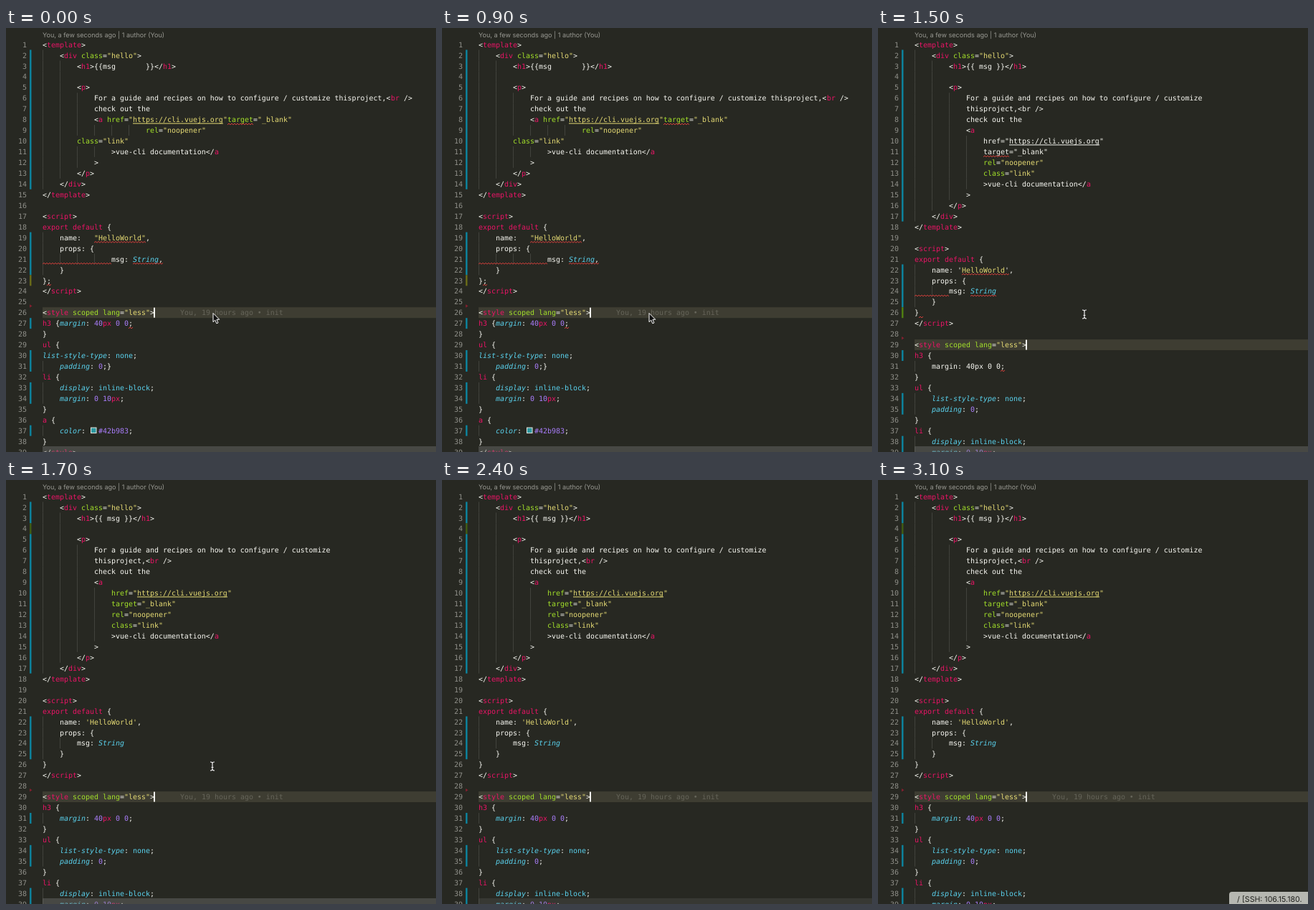
Recreate the animation shown at these times as an HTML page. Size 600 by 591 pixels, loop 3200 ms.

```html
<!DOCTYPE html>
<html lang="en">
<head>
<meta charset="utf-8">
<title>Format on save</title>
<style>
  html, body { margin: 0; width: 100%; height: 100%; overflow: hidden; background: #272822; }
  svg { display: block; width: 600px; height: 591px; }
  text { white-space: pre; text-rendering: geometricPrecision; }
  .code { font: 9.966px "DejaVu Sans Mono", monospace; }
  .ui { font-family: Inter, sans-serif; }
</style>
</head>
<body>
<svg id="stage" viewBox="0 0 600 591" xmlns="http://www.w3.org/2000/svg"></svg>
<script>
(() => {
const LOOP = 3200, STEP = 100;
const LEFT = 51, CHAR = 6, PITCH = 14.95, ROWS = 39;
const TEAL = '#0d819b', GREEN = '#4f7d12', OLIVE = '#686a18';
const COLORS = {
  w: '#f8f8f2', p: '#ea1466', g: '#a3e02a', y: '#e6db74', u: '#e6db74',
  l: '#f8f8f2', c: '#5ad2ee', k: '#5ad2ee', v: '#a97dfa', b: '#66655a'
};

// ^x switches colour: u and l are underlined, c is italic.
const head = [
  '<^ptemplate^w>',
  '    <^pdiv ^gclass^w=^y"hello"^w>'
];
const scriptOpen = ['</^ptemplate^w>', '', '<^pscript^w>', '^pexport default ^w{'];
const styleOpen = ['</^pscript^w>', '', '<^pstyle ^gscoped lang^w=^y"less"^w>'];
const guide = '            For a guide and recipes on how to configure / customize';
const tagEnd = '>vue-cli documentation</^pa';
const display = '    ^cdisplay^w: ^kinline-block^w;';
const margin = '    ^cmargin^w: ^v0 10^ppx^w;';

const messy = [
  ...head,
  '        <^ph1^w>{{msg       }}</^ph1^w>',
  '',
  '        <^pp^w>',
  guide + ' thisproject,<^pbr ^w/>',
  '            check out the',
  '            <^pa ^ghref^w=^y"^uhttps://cli.vuejs.org^y"^gtarget^w=^y"_blank"',
  '                        ^grel^w=^y"noopener"',
  '        ^gclass^w=^y"link"',
  '                ' + tagEnd,
  '            >',
  '        </^pp^w>',
  '    </^pdiv^w>',
  ...scriptOpen,
  '    name:   ^y"HelloWorld"^w,',
  '    props: {',
  '                msg: ^cString^w,',
  '    }',
  '};',
  ...styleOpen,
  '^ph3 ^w{^cmargin^w: ^v40^ppx ^v0 0^w;',
  '}',
  '^pul ^w{',
  '^clist-style-type^w: ^knone^w;',
  '    ^cpadding^w: ^v0^w;}',
  '^pli ^w{',
  display,
  margin,
  '}',
  '^pa ^w{',
  '    ^ccolor^w:   ^v#42b983^w;',
  '}',
  '</^pstyle^w>'
];

const tidy = [
  ...head,
  '        <^ph1^w>{{ msg }}</^ph1^w>',
  '',
  '        <^pp^w>',
  guide,
  '            thisproject,<^pbr ^w/>',
  '            check out the',
  '            <^pa',
  '                ^ghref^w=^y"^uhttps://cli.vuejs.org^y"',
  '                ^gtarget^w=^y"_blank"',
  '                ^grel^w=^y"noopener"',
  '                ^gclass^w=^y"link"',
  '                ' + tagEnd,
  '            >',
  '        </^pp^w>',
  '    </^pdiv^w>',
  ...scriptOpen,
  "    name: ^y'HelloWorld'^w,",
  '    props: {',
  '        msg: ^cString',
  '    }',
  '}',
  ...styleOpen,
  '^ph3 ^w{',
  '    ^cmargin^w: ^v40^ppx ^v0 0^w;',
  '}',
  '^pul ^w{',
  '    ^clist-style-type^w: ^knone^w;',
  '    ^cpadding^w: ^v0^w;',
  '}',
  '^pli ^w{',
  display,
  margin
];

// Right after formatting, moved lines keep outdated colours.
const stale = tidy.slice();
stale[6] = '            thisproject,<br />';
stale[9] = '                href="^lhttps://cli.vuejs.org^w"';
stale[10] = '                target="_blank"';
stale[21] = "    name: '^yHelloWorld^w',";
stale[30] = '    margin: 40px 0 0;';

const stage = document.getElementById('stage');

function add(parent, tag, attrs, content) {
  const el = document.createElementNS('http://www.w3.org/2000/svg', tag);
  for (const key in attrs) el.setAttribute(key, attrs[key]);
  if (content !== undefined) el.textContent = content;
  return parent.appendChild(el);
}

const rect = (parent, x, y, width, height, fill) =>
  add(parent, 'rect', { x, y, width, height, fill });
const rowY = row => 15.5 + (row - 1) * PITCH;
const base = row => rowY(row) + 11.1;
const colX = col => LEFT + col * CHAR;

function codeText(parent, row, col, str, kind) {
  const attrs = { x: colX(col), y: base(row), fill: COLORS[kind], class: 'code' };
  if (kind === 'c') attrs.style = 'font-style: italic';
  add(parent, 'text', attrs, str);
}

function drawLine(parent, src, row) {
  let col = 0, kind = 'w';
  for (const part of src.split(/(\^[a-z])/)) {
    if (/^\^[a-z]$/.test(part)) { kind = part[1]; continue; }
    const word = part.trim();
    if (word) {
      const start = col + part.indexOf(word);
      codeText(parent, row, start, word, kind);
      if (kind === 'u' || kind === 'l')
        rect(parent, colX(start), base(row) + 1.3, word.length * CHAR, 1, COLORS[kind]);
    }
    col += part.length;
  }
}

function drawGuides(parent, lines) {
  const depth = i => {
    const indent = lines[i].replace(/\^[a-z]/g, '').search(/\S/);
    return Math.max(0, Math.ceil(indent / 4));
  };
  lines.forEach((line, i) => {
    const n = line ? depth(i) : Math.min(depth(i - 1), depth(i + 1));
    for (let k = 0; k < n; k++) rect(parent, colX(k * 4), rowY(i + 1), 1, PITCH, '#41423c');
  });
}

function squiggle(parent, row, col, len) {
  const y = base(row) + 2.7, end = colX(col + len);
  let d = '', up = false;
  for (let x = colX(col); x <= end; x += 2, up = !up)
    d += (d ? 'L' : 'M') + x + ' ' + (y + (up ? -0.9 : 0.9));
  add(parent, 'path', { d, fill: 'none', stroke: '#d8403c', 'stroke-width': 1 });
}

function buildState({ lines, bars, errors, styleRow }) {
  const g = add(stage, 'g', {});
  const y = rowY(styleRow);
  rect(g, LEFT, y, 549, PITCH, '#3e3d32');
  drawGuides(g, lines);
  lines.forEach((line, i) => drawLine(g, line, i + 1));
  for (const [from, to, color] of bars)
    rect(g, 33, rowY(from), 2.5, (to - from + 1) * PITCH, color || TEAL);
  for (const e of errors) squiggle(g, ...e);
  add(g, 'path', { d: `M33 ${y - 4}l3.5 2.2l-3.5 2.2z`, fill: '#82202f' });
  rect(g, 206, y + 0.5, 2, PITCH - 1, '#f8f8f0');
  return g;
}

rect(stage, 0, 0, 600, 591, '#272822');
add(stage, 'text', { x: 51, y: 12.7, fill: '#989892', class: 'ui', 'font-size': 9.1 },
  'You, a few seconds ago | 1 author (You)');
for (let n = 1; n <= ROWS; n++)
  add(stage, 'text', { x: 29, y: base(n), fill: '#90908a', class: 'code', 'text-anchor': 'end' }, n);

const before = buildState({
  lines: messy, styleRow: 26,
  bars: [[2, 14], [19, 22], [23, 23, OLIVE], [27, 27], [30, 31], [33, 34], [37, 37]],
  errors: [[8, 43, 6], [19, 12, 12], [21, 0, 16], [21, 21, 7], [23, 1, 1], [27, 20, 1]]
});
add(before, 'rect', {
  x: 118.5, y: rowY(37) + 3.4, width: 7.5, height: 7.5, fill: '#2c98a0', stroke: '#e8e8e2'
});
const between = buildState({
  lines: stale, styleRow: 29,
  bars: [[2, 17], [22, 25], [26, 26, GREEN], [30, 30], [34, 35], [38, 39]],
  errors: [[11, 16, 6], [22, 11, 11], [24, 0, 8], [24, 13, 6], [26, 1, 1], [31, 20, 1]]
});
const after = buildState({
  lines: tidy, styleRow: 29,
  bars: [[2, 3], [4, 4, '#3f5a14'], [5, 17], [22, 25], [31, 31], [34, 35], [38, 39]],
  errors: []
});
for (const [g, row] of [[before, 26], [after, 29]])
  codeText(g, row, 32, 'You, 19 hours ago • init', 'b');

const scrollbar = rect(stage, LEFT, 583, 549, 8, '#797979');

const tooltip = add(stage, 'g', {});
add(tooltip, 'path', { d: 'M490 591V578q0-4 4-4H600V591z', fill: '#b6b7b1' });
for (const [x, str] of [[501, '/'], [508, '[SSH: 106.15.180.']])
  add(tooltip, 'text', { x, y: 587.5, fill: '#20211d', class: 'ui', 'font-size': 10.6 }, str);

const arrow = add(stage, 'path', {
  d: 'M289 397.5v12.2l2.8-2.6 2 4.7 2.2-.9-2-4.6h3.8z',
  fill: '#111', stroke: '#fff', 'stroke-width': 1
});
const beam = add(stage, 'g', {});
for (const [stroke, width] of [['#222', 2.6], ['#f0f0ee', 1.2]])
  add(beam, 'path', {
    d: 'M-3-6q3 0 3 2q0-2 3-2M0-4V4M-3 6q3 0 3-2q0 2 3 2M-1.5 1.5h3',
    fill: 'none', stroke, 'stroke-width': width
  });

const clamp = v => Math.max(0, Math.min(1, v));
const show = (el, on) => el.setAttribute('display', on ? 'inline' : 'none');

function draw(ms) {
  const t = Math.floor(ms % LOOP / STEP) * STEP;
  show(before, t < 1500);
  show(between, t >= 1500 && t < 1700);
  show(after, t >= 1700);
  show(arrow, t < 1400);
  show(beam, t >= 1400 && t < 2200);
  const k = Math.max(0, (t - 1700) / 300);
  beam.setAttribute('transform', `translate(${288 + 183 * k} ${399 + 159 * k})`);
  scrollbar.setAttribute('opacity', 0.4 * (1 - clamp((t - 2200) / 400)));
  show(tooltip, t >= 2600);
}

const begin = performance.now();
function tick() {
  draw(performance.now() - begin);
  requestAnimationFrame(tick);
}
tick();
})();
</script>
</body>
</html>
```
